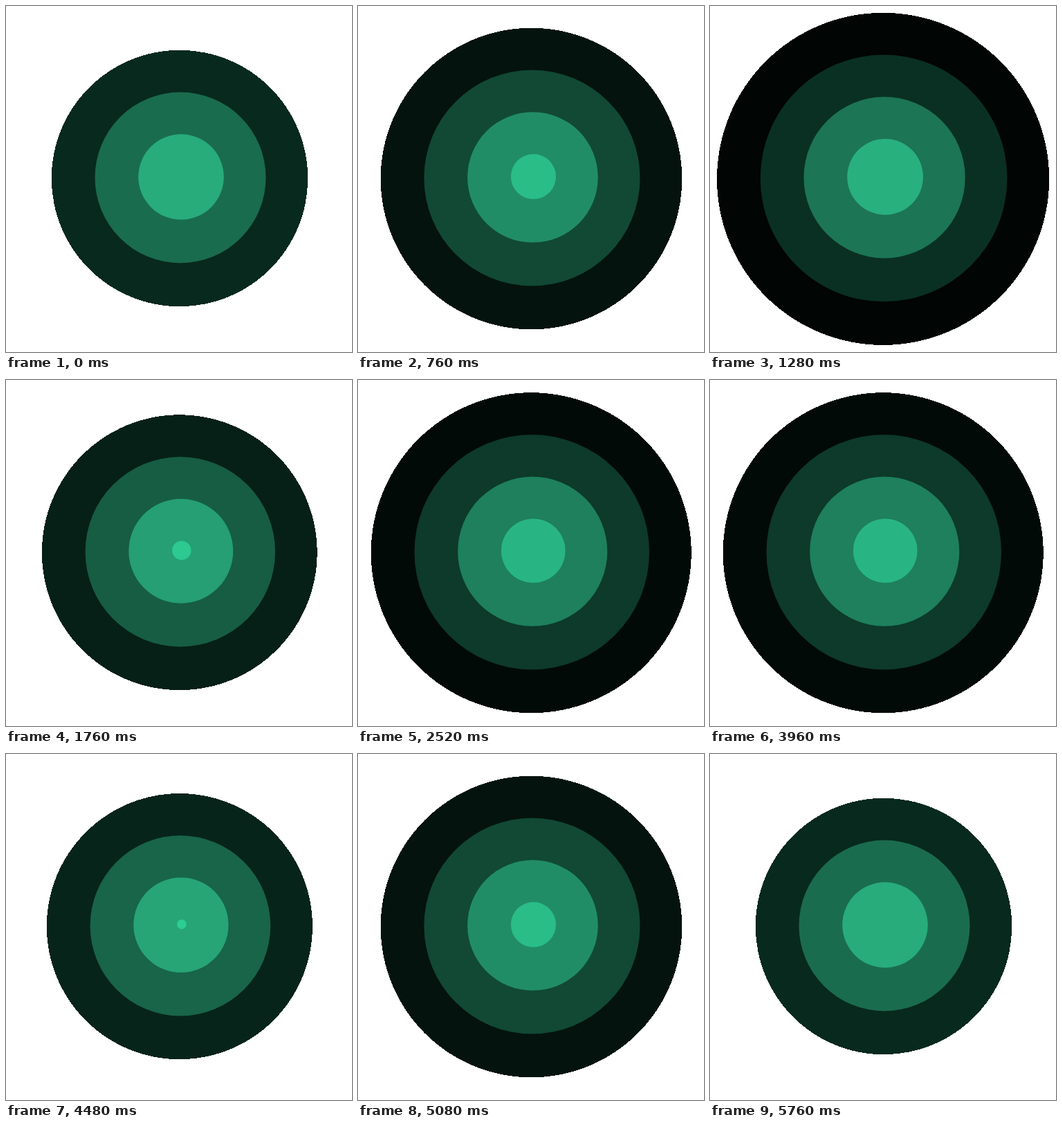
These frames come from a looping animation (500 px wide and 500 px high, 5800 ms). An HTML page:

```html
<!DOCTYPE html>
<html lang="en">
<head>
<meta charset="utf-8">
<title>Expanding rings</title>
<style>
  html, body { margin: 0; width: 100%; height: 100%; overflow: hidden; background: #fff; }
  svg { display: block; width: 100%; height: 100%; }
</style>
</head>
<body>
<svg id="stage" viewBox="0 0 500 500"></svg>
<script>
const LOOP = 5800, STEP = 40;
const RINGS = 4, STEPS_PER_RING = 36;
const MAX_RADIUS = 246.94;

// Ring colour by age, from birth (0) to the rim (1)
const STOPS = [
  [0, 45, 209, 150],
  [0.25, 40, 172, 124],
  [0.4375, 30, 128, 93],
  [0.5, 26, 108, 78],
  [0.75, 8, 41, 30],
  [1, 0, 0, 0]
];

function colorAt(age) {
  const i = STOPS.findIndex(stop => stop[0] > age);
  const a = STOPS[i - 1], b = STOPS[i];
  const k = (age - a[0]) / (b[0] - a[0]);
  const rgb = [1, 2, 3].map(c => Math.round(a[c] + (b[c] - a[c]) * k));
  return `rgb(${rgb})`;
}

// Oldest ring first, so that younger ones lie on top
const stage = document.getElementById("stage");
const circles = Array.from({ length: RINGS }, (_, i) => {
  const circle = document.createElementNS("http://www.w3.org/2000/svg", "circle");
  if (i === 0) circle.setAttribute("shape-rendering", "crispEdges");
  return stage.appendChild(circle);
});

function render(ms) {
  const step = Math.floor((ms % LOOP) / STEP + 0.001);
  const phase = (step % STEPS_PER_RING) / STEPS_PER_RING;
  circles.forEach((circle, i) => {
    const age = (RINGS - 1 - i + phase) / RINGS;
    circle.setAttribute("cx", 254 - 4 * age);
    circle.setAttribute("cy", 246 + 4 * age);
    circle.setAttribute("r", MAX_RADIUS * age);
    circle.setAttribute("fill", colorAt(age));
  });
}

const start = performance.now();
function tick() {
  render(performance.now() - start);
  requestAnimationFrame(tick);
}
tick();
</script>
</body>
</html>
```
